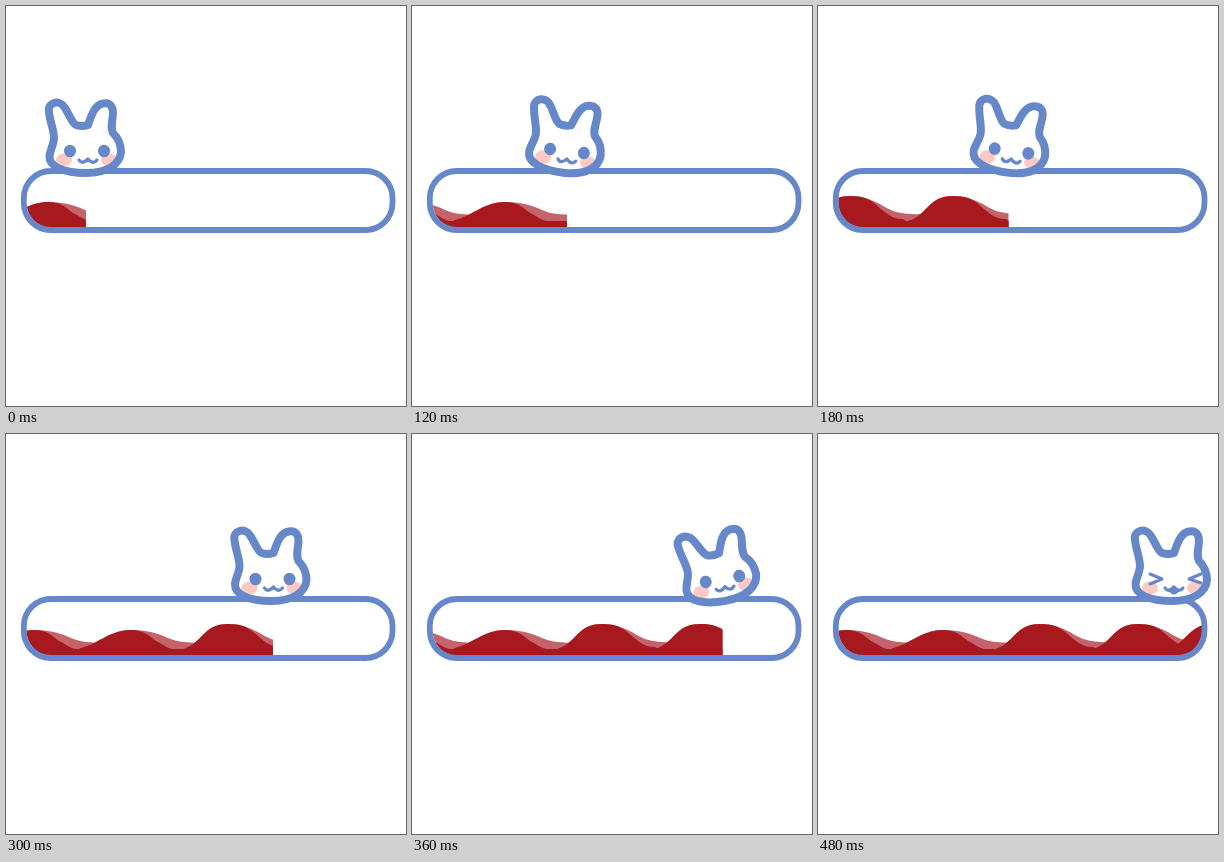
An HTML page with a canvas that plays this animation: 400x400 px, repeating every 540 ms.

```html
<!DOCTYPE html>
<html lang="en">
<head>
<meta charset="utf-8">
<title>Bunny loading bar</title>
<style>
  html, body { margin: 0; width: 100%; height: 100%; overflow: hidden; background: #fff; }
  canvas { display: block; width: 400px; height: 400px; }
</style>
</head>
<body>
<canvas id="stage" width="400" height="400"></canvas>
<script>
const ctx = document.getElementById('stage').getContext('2d');
const BLUE = '#6788c8', RED = '#a8191f', ROSE = '#c5636a', PINK = '#fcc9c5';
const STEP_MS = 60;

// Each pose: bunny x and tilt, liquid edge, crests of the low and tall waves.
const poses = [
  { x: 81, tilt: 0, edge: 80, low: [42], tall: [] },
  { x: 118, tilt: 4, edge: 118, low: [-36, 61], tall: [] },
  { x: 155, tilt: 7, edge: 155, low: [-4, 93], tall: [] },
  { x: 193.5, tilt: 8, edge: 190.5, low: [], tall: [32, 135] },
  { x: 230, tilt: 4, edge: 228, low: [-36, 61], tall: [158] },
  { x: 266.5, tilt: 0, edge: 267, low: [28, 125], tall: [222] },
  { x: 310.5, tilt: -10, edge: 310.5, low: [-4, 93], tall: [190, 288] },
  { x: 333, tilt: -5, edge: 347, low: [-36, 61], tall: [158, 255, 352] },
  { x: 355, tilt: 0, edge: 384, low: [28, 125], tall: [222, 320, 395], happy: true }
];

const bar = new Path2D();
bar.roundRect(17.8, 165, 368.7, 59, 27);
const inside = new Path2D();
inside.roundRect(20.5, 167.5, 363.5, 54, 25);

// Wave outlines, with x measured from the crest.
const waves = {
  low: {
    back: 'M-62 223 Q-55 215 -47 213 C-32 209 -20 196 0 196 C18 196 28 200 37 204 C48 209 58 208 67 209 L78 223Z',
    front: 'M-62 223 Q-55 215 -47 213 C-32 209 -20 196 0 196 C14 196 18 202 25 207 C32 210 38 216 47 216 L60 223Z'
  },
  tall: {
    back: 'M-52 223 L-45 215 C-25 209 -25 190 0 190 C20 190 30 199 43 205 Q58 209 70 208 L84 223Z',
    front: 'M-52 223 L-45 215 C-25 209 -25 190 0 190 C14 190 18 193 24 197 C34 205 40 213 53 213 L68 223Z'
  }
};
for (const wave of Object.values(waves))
  for (const layer in wave) wave[layer] = new Path2D(wave[layer]);

// Bunny outlines; the point between the eyes is (81, 145).
const head = new Path2D('M43 106 C41 96 54 93 59 102 C63 108 66 117 70 119 Q76 121 82 119 ' +
  'C85 111 88 99 97 97.5 C106 96 108 103 106.5 112 C105.5 119 105 123 107 127 ' +
  'C112 132 115 139 115 146 C114 158 102 167 80 167 C58 167 43 161 43.5 150 ' +
  'C44 144 48 138 48 132 C48 124 44 116 43 106Z');
const mouth = new Path2D('M73 154 Q76 159 82 153 Q87 159 91 154');
const squint = new Path2D('M58 140 L70 145 L58 150 M109 140 L97 145 L109 149');
const openMouth = new Path2D('M76 156 L82 152 L88 156 Q82 165 76 156Z');

function fill(path, color) {
  ctx.fillStyle = color;
  ctx.fill(path);
}

function stroke(path, width) {
  ctx.strokeStyle = BLUE;
  ctx.lineWidth = width;
  ctx.stroke(path);
}

function oval(x, y, rx, ry, color) {
  const path = new Path2D();
  path.ellipse(x, y, rx, ry, 0, 0, Math.PI * 2);
  fill(path, color);
}

function drawLiquid(pose) {
  ctx.save();
  ctx.clip(inside);
  ctx.beginPath();
  ctx.rect(0, 160, pose.edge, 70);
  ctx.clip();
  for (const [layer, color] of [['back', ROSE], ['front', RED]]) {
    for (const kind of ['low', 'tall']) {
      for (const crest of pose[kind]) {
        ctx.save();
        ctx.translate(crest, 0);
        fill(waves[kind][layer], color);
        ctx.restore();
      }
    }
  }
  ctx.fillStyle = RED;
  ctx.fillRect(0, 215, 400, 10);
  ctx.restore();
}

function drawBunny({ x, tilt, happy }) {
  ctx.save();
  ctx.translate(x, 145);
  ctx.rotate(tilt * Math.PI / 180);
  ctx.translate(-81, -145);
  fill(head, '#fff');
  ctx.save();
  ctx.clip(head);
  oval(58, 154, 8, 6.5, PINK);
  oval(103, 154, 8, 6.5, PINK);
  ctx.restore();
  stroke(head, 8);
  stroke(mouth, 3.3);
  if (happy) {
    stroke(squint, 3);
    fill(openMouth, BLUE);
  } else {
    oval(64, 145, 6, 6.3, BLUE);
    oval(98, 145, 6, 6.3, BLUE);
  }
  ctx.restore();
}

function draw(now) {
  const pose = poses[Math.floor(now / STEP_MS) % poses.length];
  ctx.fillStyle = '#fff';
  ctx.fillRect(0, 0, 400, 400);
  ctx.lineCap = ctx.lineJoin = 'round';
  drawLiquid(pose);
  stroke(bar, 5.8);
  drawBunny(pose);
}

let start;
function tick(now) {
  start ??= now;
  draw(now - start);
  requestAnimationFrame(tick);
}
draw(0);
requestAnimationFrame(tick);
</script>
</body>
</html>
```
